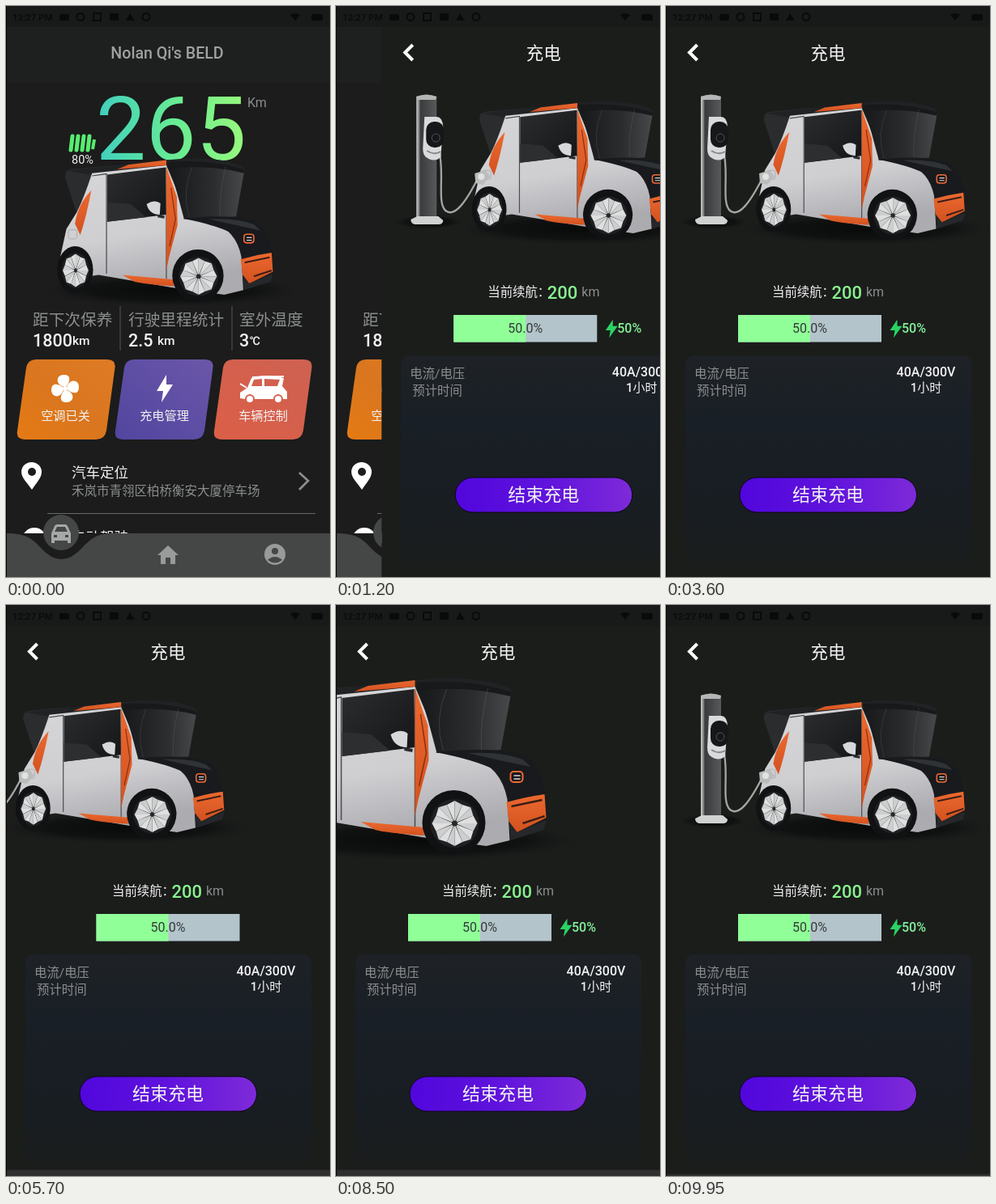
Write an HTML page that moves like this. It is 400 px wide and 706 px high and loops after 10 s.

```html
<!DOCTYPE html>
<html lang="zh-CN">
<head>
<meta charset="utf-8">
<title>充电</title>
<style>
html, body { margin: 0; width: 100%; height: 100%; overflow: hidden; background: #1c1d1c; }
svg { display: block; width: 100vw; height: 100vh; }
text { font-family: Roboto, "Noto Sans CJK SC", "Noto Sans CJK", sans-serif; fill: #f2f2f2; }
.mid { text-anchor: middle; }
.med { font-weight: 500; }
.grey { fill: #8c8e8e; }
</style>
</head>
<body>
<svg viewBox="0 0 400 706" preserveAspectRatio="none">
<defs>
  <linearGradient id="range"><stop offset="0" stop-color="#3fcfc0"/><stop offset=".55" stop-color="#69ec92"/><stop offset="1" stop-color="#98f97c"/></linearGradient>
  <linearGradient id="orange" x1="0" y1="1" x2="1" y2="0"><stop offset="0" stop-color="#e57a14"/><stop offset=".5" stop-color="#d9761f"/><stop offset="1" stop-color="#df7b25"/></linearGradient>
  <linearGradient id="purple" x1="0" y1="1" x2="1" y2="0"><stop offset="0" stop-color="#51459f"/><stop offset="1" stop-color="#6b57a9"/></linearGradient>
  <linearGradient id="red" x1="0" y1="1" x2="1" y2="0"><stop offset="0" stop-color="#dc5f48"/><stop offset="1" stop-color="#cd6151"/></linearGradient>
  <linearGradient id="pill"><stop offset="0" stop-color="#5106dd"/><stop offset=".5" stop-color="#5f13dc"/><stop offset="1" stop-color="#7e2ad9"/></linearGradient>
  <linearGradient id="card" x2="0" y2="1"><stop offset="0" stop-color="#1e2226"/><stop offset=".3" stop-color="#191f26"/><stop offset=".75" stop-color="#181d22"/><stop offset="1" stop-color="#1b1d1c"/></linearGradient>
  <linearGradient id="silver" x1="0" y1="0" x2=".25" y2="1"><stop offset="0" stop-color="#d6d5d8"/><stop offset=".6" stop-color="#cfced1"/><stop offset="1" stop-color="#acabb0"/></linearGradient>
  <linearGradient id="shield"><stop offset="0" stop-color="#16181a"/><stop offset=".6" stop-color="#2b2d2e"/><stop offset="1" stop-color="#48494b"/></linearGradient>
  <linearGradient id="glass" x2="1" y2="1"><stop offset="0" stop-color="#2b2d2f"/><stop offset="1" stop-color="#141517"/></linearGradient>
  <linearGradient id="flame" x2="0" y2="1"><stop offset="0" stop-color="#ec692f"/><stop offset="1" stop-color="#d2511f"/></linearGradient>
  <linearGradient id="post"><stop offset="0" stop-color="#d0d0d0"/><stop offset=".12" stop-color="#8a8a8a"/><stop offset=".2" stop-color="#3a3b3c"/><stop offset="1" stop-color="#58595a"/></linearGradient>
  <radialGradient id="shade"><stop offset="0" stop-color="#080909"/><stop offset=".65" stop-color="#0d0e0e" stop-opacity=".8"/><stop offset="1" stop-color="#151616" stop-opacity="0"/></radialGradient>
  <path id="bolt" d="M2-17L-10 3H-2L-4 17 10-5H2Z"/>
  <path id="tile" d="M10 0H97Q109 0 107.500 10L97 88Q95 99 84 99H-3Q-15 99-13 88L-2 10Q0 0 10 0Z"/>
  <g id="wheel"><ellipse cx="-1" cy="-1" rx="39" ry="40" fill="#111213"/><circle r="30" fill="#1f2022"/><g id="petals"></g><circle r="3.500" fill="#27282a"/></g>

  <g id="car">
    <ellipse cx="205" cy="291" rx="196" ry="25" fill="url(#shade)"/>
    <path d="M43 120Q43 108 50 107L116 101 84 145 60 172Z" fill="#2a2c2e"/>
    <path d="M46 109Q120 101 196 93T312 102Q317 104 314 110L303 112 199 102 84 116Z" fill="#202224"/>
    <path d="M84 113L197 101 217 148 224 181 268 189Q303 200 311 240L314 291 285 298 205 287 94 268 40 276Q32 270 34 248L45 198 61 172Q72 150 84 113Z" fill="url(#silver)"/>
    <path d="M199 96Q265 91 316 107L303 179 224 183 213 142Z" fill="url(#shield)"/>
    <path d="M199 96Q265 91 316 107L315 113Q260 99 201 106Z" fill="#18191b"/>
    <path d="M236 104Q220 142 232 180M287 103Q277 145 279 179" fill="none" stroke="#66686a" opacity=".4"/>
    <path d="M107 115L196 104 197 176 107 187Z" fill="url(#glass)"/>
    <path d="M107 157L143 160 166 180 107 187Z" fill="#2c2e30"/>
    <path d="M84 117L106 114V266M197 104V274" fill="none" stroke="#4a4c4f" stroke-width="1.5"/>
    <path d="M122 107L139 100 197 93V101Z" fill="url(#flame)"/>
    <path d="M83 139Q62 161 58 190L66 207Q75 181 83 139Z" fill="url(#flame)"/>
    <path d="M197 103L213 149 214 192 201 241 197 261Z" fill="url(#flame)"/>
    <path d="M204 135L211 183 202 224" fill="none" stroke="#872f13" stroke-width="1.5"/>
    <path d="M130 268L208 275V285Q162 282 148 278Z" fill="url(#flame)"/>
    <path d="M222 182Q284 175 328 184 347 190 355 219L358 236 312 243Q309 216 296 204 270 191 222 182Z" fill="#181a1d"/>
    <path d="M262 183Q305 181 330 191L340 200Q305 193 262 183Z" fill="#303336"/>
    <path d="M310 244Q334 237 357 234L359 263 323 281 313 268Z" fill="url(#flame)"/>
    <path d="M316 249L354 241M330 270L357 261" stroke="#3a1e17" stroke-width="2.500"/>
    <path d="M313 268L323 281 359 266 356 278 315 291Z" fill="#25272a"/>
    <rect x="315" y="206" width="15" height="13" rx="4" fill="#151719" stroke="#ef6837" stroke-width="2"/>
    <path d="M319 211H327M319 215H327" stroke="#d9d9d9" stroke-width="1.5"/>
    <path d="M167 160Q180 152 188 159L187 176Q171 176 167 160Z" fill="#d7d8da"/>
    <path d="M184 178L194 180" stroke="#292b2d" stroke-width="4"/>
    <rect x="48" y="199" width="13" height="14" rx="3" fill="none" stroke="#a5a5a8"/>
    <use href="#wheel" transform="translate(59 261) scale(.7 .9)"/>
    <use href="#wheel" transform="translate(246 270)"/>
  </g>

  <g id="charger">
    <ellipse cx="58" cy="267" rx="42" ry="9" fill="url(#shade)"/>
    <path d="M43 112Q55 107 68 112V265H43Z" fill="url(#post)"/>
    <path d="M43 112Q55 107 68 112L67 116H44Z" fill="#b4b5b5"/>
    <path d="M36 264L44 260H70L76 265Q76 270 70 270H41Q36 269 36 264Z" fill="#d0d1d1"/>
    <path d="M71 180C78 205 68 244 79 253S104 243 121 209" fill="none" stroke="#a4a6a6" stroke-width="2.3"/>
    <path d="M53 137H68Q75 137 76 149L73 187Q65 194 55 187 51 184 51 176Z" fill="#d9dadb"/>
    <rect x="55" y="143" width="22" height="32" rx="10" fill="#151719"/>
    <circle cx="67" cy="163" r="5" fill="none" stroke="#505357"/>
    <path d="M56 179Q65 185 73 180" fill="none" stroke="#888" stroke-width="2"/>
  </g>
  <g id="plug"><path d="M115 207L128 203 134 211 125 221 116 219Z" fill="#bbbdbd"/><circle cx="123" cy="211" r="4" fill="#e2e2e2"/></g>
  <clipPath id="body"><rect width="400" height="652"/></clipPath>
</defs>

<g id="home">
  <rect width="400" height="706" fill="#1b1c1b"/>
  <rect y="26" width="400" height="69" fill="#1e1f1f"/>
  <text class="mid med" x="199" y="65" font-size="19.6" style="fill:#a0a1a1">Nolan Qi's BELD</text>
  <text x="111" y="190" font-size="110" style="fill:url(#range)">265</text>
  <text class="grey" x="298" y="125" font-size="16">Km</text>
  <path d="M82 161L80 178M89 161L87 178M96 161L94 178M103 161L101 178" stroke="#58ed70" stroke-width="5" stroke-linecap="round"/>
  <path d="M109 165L107 177" stroke="#58ed70" stroke-width="4"/>
  <text x="81" y="195" font-size="14.5">80%</text>
  <use href="#car" transform="translate(38 115) scale(.812)"/>
  <path d="M141 371V426M279 371V426" stroke="#555757"/>
  <g font-size="19.7">
    <text class="grey" x="33" y="395">距下次保养</text>
    <text class="grey" x="151" y="395">行驶里程统计</text>
    <text class="grey" x="288" y="395">室外温度</text>
  </g>
  <g class="med" font-size="21.5">
    <text x="33" y="421">1800</text><text x="82" y="419" font-size="15.5">km</text>
    <text x="151" y="421">2.5</text><text x="187" y="419" font-size="15.5">km</text>
    <text x="288" y="421">3</text><text x="301" y="419" font-size="14.5">℃</text>
  </g>
  <use href="#tile" x="27" y="437" fill="url(#orange)"/>
  <use href="#tile" x="148" y="437" fill="url(#purple)"/>
  <use href="#tile" x="270" y="437" fill="url(#red)"/>
  <g id="fan" transform="translate(73 473)" fill="#fff"></g>
  <use href="#bolt" transform="translate(196 473)" fill="#fff"/>
  <path d="M289 485V478L298 472 303 460Q320 454 343 460L341 470 347 477V486H342A6 6 0 0 0 330 486H307A6 6 0 0 0 295 486ZM306 462L303 470H316V461ZM319 461V470H335L338 462Z" fill="#fff" fill-rule="evenodd"/>
  <path d="M289 467L297 472M304 459L343 458" stroke="#fff" stroke-width="2"/>
  <circle cx="301" cy="486" r="4" fill="#fff"/><circle cx="336" cy="486" r="4" fill="#fff"/>
  <g class="mid" font-size="15.2"><text x="73.5" y="512">空调已关</text><text x="195.5" y="512">充电管理</text><text x="317.5" y="512">车辆控制</text></g>
  <g clip-path="url(#body)">
    <path d="M32 598C25 588 19 583 19 576A12.5 12 0 0 1 44 576C44 583 38 589 32 598ZM32 571A5 5 0 0 0 32 581 5 5 0 0 0 32 571Z" fill="#fff" fill-rule="evenodd"/>
    <text x="81" y="583" font-size="17.5">汽车定位</text>
    <text class="grey" x="81" y="605" font-size="15.5">禾岚市青翎区柏桥衡安大厦停车场</text>
    <path d="M362 577L373 587 362 598" fill="none" stroke="#8d8f8f" stroke-width="2.7"/>
    <path d="M51 627.5H382" stroke="#686969"/>
    <circle cx="35" cy="660" r="15" fill="#fff"/>
    <text x="81" y="663" font-size="17.5">自动驾驶</text>
  </g>
  <path d="M0 652C25 652 33 659 43 670Q68 698 94 670C105 658 113 652 132 652H400V706H0Z" fill="#454646"/>
  <circle cx="68" cy="651" r="22" fill="#454646"/>
  <path d="M56 652L60 643Q61 641 63 641H73Q75 641 76 643L80 652V664H76V661H60V664H56ZM60 650H76L73 644H63ZM59 654V657H63V654ZM73 654V657H77V654Z" fill="#a6a7a7" fill-rule="evenodd"/>
  <path d="M187 679L200 667 213 679H209V690H203V682H197V690H191V679Z" fill="#999a9a"/>
  <circle cx="332" cy="678" r="13" fill="#999a9a"/>
  <circle cx="332" cy="674" r="4" fill="#454646"/>
  <path d="M323 685Q332 677 341 685 332 692 323 685Z" fill="#454646"/>
</g>

<g id="charge">
  <rect width="400" height="706" fill="#1b1d1b"/>
  <g id="plugged">
    <use href="#car" transform="translate(87 47) scale(.785)"/>
    <use href="#charger"/>
    <use href="#plug"/>
  </g>
  <use id="free" href="#car"/>
  <path d="M38.500 48L29 57.500 38.500 67" fill="none" stroke="#fff" stroke-width="4"/>
  <text class="mid" x="200" y="66" font-size="21.5">充电</text>
  <text x="131" y="359" font-size="15.4">当前续航：</text>
  <text class="med" x="204.500" y="362" font-size="22" style="fill:#88f38f">200</text>
  <text class="grey" x="247" y="359" font-size="16">km</text>
  <g id="meter">
    <rect x="89" y="382" width="177" height="33.500" fill="#b4c4cb"/>
    <rect x="89" y="382" width="89" height="33.500" fill="#90ff98"/>
    <text class="mid" x="177.500" y="404" font-size="16" style="fill:#333a38">50.0%</text>
  </g>
  <g id="level">
    <use href="#bolt" transform="translate(284 399) scale(.75 .66)" fill="#2bd263"/>
    <text class="med" x="291" y="404" font-size="16" style="fill:#84f29a">50%</text>
  </g>
  <rect x="24" y="432" width="353" height="265" rx="10" fill="url(#card)"/>
  <text class="grey" x="35" y="460" font-size="15.4">电流/电压</text>
  <text class="grey" x="38" y="481" font-size="15.4">预计时间</text>
  <text class="mid med" x="321" y="458" font-size="16">40A/300V</text>
  <text class="mid med" x="321" y="477" font-size="15">1小时</text>
  <rect x="91" y="583" width="218.500" height="43" rx="21.500" fill="url(#pill)" stroke="#0b0613"/>
  <text class="mid" x="200" y="612" font-size="22">结束充电</text>
  <g id="snack">
    <rect width="400" height="52" fill="#2f302f"/>
    <text id="note" x="28.500" y="31" font-size="15.4"></text>
  </g>
</g>

<rect width="400" height="26" fill="#181919"/>
<g fill="#090a0a">
  <text x="8" y="18" font-size="11.500" class="med" style="fill:#090a0a">12:27 PM</text>
  <rect x="66" y="10" width="12" height="8" rx="2"/>
  <path d="M128 9H139V18H128ZM148 18L153 9 159 18ZM351 11Q357 7 363 11L357 18Z"/>
  <rect x="377" y="10" width="14" height="8" rx="2"/>
  <g fill="none" stroke="#090a0a" stroke-width="2"><circle cx="92" cy="13.500" r="4.500"/><rect x="108" y="9" width="9" height="9"/><circle cx="173" cy="13.500" r="4.500"/></g>
</g>
<rect width="1" height="706" fill="#050505"/>
</svg>

<script>
const $ = id => document.getElementById(id);
const LOOP = 10000, W = 400, SNACK = 51;
const clamp = v => Math.max(0, Math.min(1, v));
const span = (t, start, length) => clamp((t - start) / length);
const smooth = p => p * p * (3 - 2 * p);
const outCubic = p => 1 - (1 - p) ** 3;

// cubic-bezier(.4, 0, .2, 1)
function standard(p) {
  let lo = 0, hi = 1;
  for (let i = 0; i < 20; i++) {
    const s = (lo + hi) / 2, r = 1 - s;
    if (1.2 * s * r * r + 0.6 * s * s * r + s ** 3 < p) lo = s; else hi = s;
  }
  return lo * lo * (3 - 2 * lo);
}

function spin(count, shape) {
  return Array.from({ length: count }, (_, i) => `<g transform="rotate(${i * 360 / count})">${shape}</g>`).join('');
}

const move = (id, x, y = 0) => $(id).setAttribute('transform', `translate(${x.toFixed(2)} ${y.toFixed(2)})`);
const show = (id, on) => $(id).setAttribute('display', on ? 'inline' : 'none');

$('petals').innerHTML = spin(8, '<path d="M0-1L-9.500-23 0-28Z" fill="#dfdfdf"/><path d="M0-1L9.500-23 0-28Z" fill="#cdcecf"/>');
$('fan').innerHTML = spin(4, '<path d="M-1-2C-13-5-11-17-2-17 8-17 6-9 2-3Z"/>') + '<circle r="3"/>';

const leave = (t, start) => -W * smooth(span(t, start, 464));
const enter = (t, start) => W * (1 - outCubic(span(t, start + 250, 500)));
const snackHeight = (t, open, close) =>
  SNACK * (t < close ? standard(span(t, open, 250)) : standard(1 - span(t, close, 250)));

function draw(t) {
  const again = t >= 8500;
  const ended = t >= 5550 && !again;

  show('charge', t >= 950);
  move('charge', W * (1 - outCubic(span(t, 950, 523))));

  move('plugged', again ? enter(t, 8350) : leave(t, 5550));
  move('free', again ? leave(t, 8350) : enter(t, 5550));
  show('free', t >= 5550);

  move('meter', ended ? 22.5 : 0);
  show('level', !ended);

  const height = again ? snackHeight(t, 8449, 9733) : snackHeight(t, 5649, 6945);
  $('note').textContent = again ? '充电已开始' : '充电已结束';
  move('snack', 0, 706 - height);
  show('snack', height > 0.05);
}

const begin = performance.now();
function tick() {
  draw((performance.now() - begin) % LOOP);
  requestAnimationFrame(tick);
}
tick();
</script>
</body>
</html>
```
